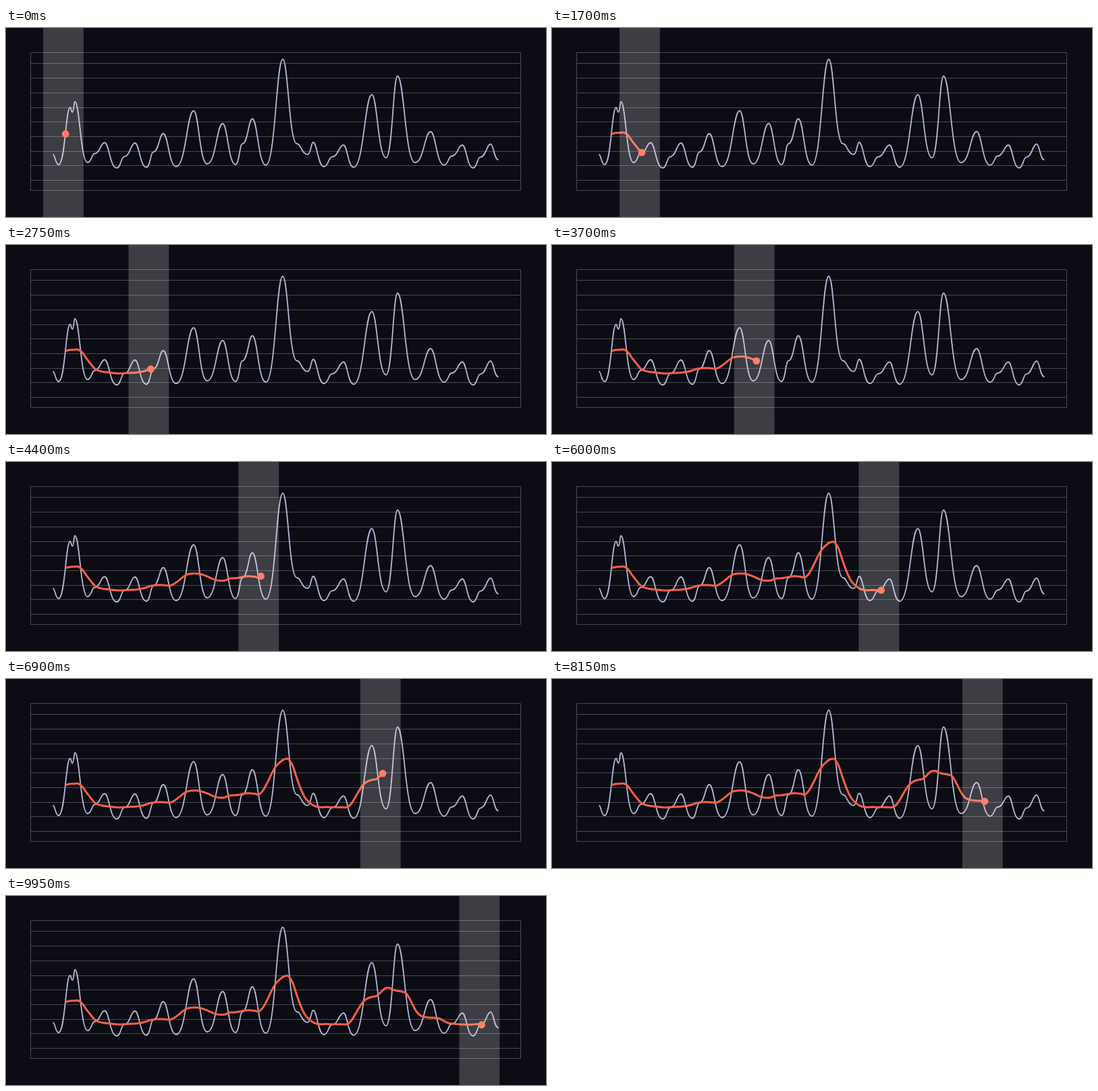
Write an HTML page that moves like this. It is 800x281 px and loops after 10 s.

```html
<!DOCTYPE html>
<html lang="en">
<head>
<meta charset="utf-8">
<title>Moving average</title>
<style>
  html, body { margin: 0; width: 100%; height: 100%; overflow: hidden; background: #0c0c15; }
  svg { display: block; width: 800px; height: 281px; }
  path { fill: none; stroke-linejoin: round; }
  #grid { stroke: #4a4a53; }
  #signal { stroke: #b6b5d3; stroke-width: 1.8; }
  #average { stroke: #ff5f45; stroke-width: 3; }
  #dot { fill: #ff5f45; }
  #band { fill: #fff; fill-opacity: .2; }
</style>
</head>
<body>
<svg viewBox="0 0 800 281">
  <path id="grid"/>
  <path id="signal"/>
  <path id="average"/>
  <circle id="dot" r="5.4"/>
  <rect id="band" width="59.8" height="281"/>
</svg>
<script>
const LOOP = 10000, TRAVEL = 9950;
const START = 69.5, DAY = 660 / 106, AVERAGED_DAYS = 100;
const get = id => document.getElementById(id);

// Turning points of the signal: weekly peaks and the valleys between them.
const turns = [
  [69.5, 188], [78, 203], [95, 118], [98.5, 125], [102, 109.5], [121, 200], [146, 170.5],
  [164, 208], [191, 171], [208, 207], [233, 157], [252, 206], [278, 123], [298, 202],
  [321, 142], [340, 203], [365, 135], [385, 204], [410, 46.5], [431, 172], [447, 188],
  [455, 170], [471, 206], [500, 174], [515, 207], [542, 99], [563, 193], [580, 71.5],
  [606, 200], [629, 154], [649, 204], [676, 174], [692, 208], [718, 172.5], [729.5, 196]
];

// Slow, low climbs pause on a shelf on the way up.
const knots = turns.flatMap(([x, y], i) => {
  const [nextX, nextY] = turns[i + 1] || [x, y];
  const run = nextX - x, rise = y - nextY;
  const shelf = run >= 25 && rise > 0 && rise < 70;
  return shelf ? [[x, y], [x + run * .4, y - rise * .45]] : [[x, y]];
});

// Level tangents at both ends; valleys are broader than peaks.
const handle = (y, otherY) => y > otherY ? .56 : .38;

const signalPath = "M" + knots[0] + knots.slice(1).map(([x, y], i) => {
  const [x0, y0] = knots[i], run = x - x0;
  return `C${x0 + run * handle(y0, y)},${y0} ${x - run * handle(y, y0)},${y} ${x},${y}`;
}).join("");

function signalAt(x) {
  const i = Math.max(1, knots.findIndex(k => k[0] >= x));
  const [x0, y0] = knots[i - 1], [x1, y1] = knots[i];
  const a = handle(y0, y1), b = 1 - handle(y1, y0), goal = (x - x0) / (x1 - x0);
  let low = 0, high = 1, s = .5;
  for (let n = 0; n < 20; n++) {
    const reached = 3 * s * (1 - s) ** 2 * a + 3 * s * s * (1 - s) * b + s ** 3;
    if (reached < goal) low = s; else high = s;
    s = (low + high) / 2;
  }
  return y0 + (y1 - y0) * s * s * (3 - 2 * s);
}

// Mean of seven days centred on the given day.
function averageAt(day) {
  let sum = 0;
  for (let d = -3; d <= 3; d++) sum += signalAt(START + (day + d) * DAY);
  return sum / 7;
}

// Catmull-Rom curve through equally spaced values.
function evenPath(x0, step, values) {
  const value = i => values[Math.min(Math.max(i, 0), values.length - 1)];
  const tangent = i => (value(i + 1) - value(i - 1)) / 6;
  let d = `M${x0},${values[0]}`;
  for (let i = 1; i < values.length; i++) {
    const x = x0 + i * step;
    d += `C${x - step * 2 / 3},${value(i - 1) + tangent(i - 1)} ` +
         `${x - step / 3},${value(i) - tangent(i)} ${x},${value(i)}`;
  }
  return d;
}

let gridPath = "M36.5,36.5H762.5V241.5H36.5Z";
for (let i = 0; i < 9; i++) gridPath += `M36.5,${Math.floor(52.95 + i * 21.7) + .5}H762.5`;
get("grid").setAttribute("d", gridPath);
get("signal").setAttribute("d", signalPath);

const trail = get("average"), dot = get("dot"), band = get("band");
const averages = Array.from({ length: AVERAGED_DAYS }, (_, i) => averageAt(i + 3));
trail.setAttribute("d", evenPath(START + 3 * DAY, DAY, averages));
const total = trail.getTotalLength();

function draw() {
  const t = Math.min(performance.now() % LOOP / TRAVEL, 1);
  const length = total * t * t * (3 - 2 * t);
  const point = trail.getPointAtLength(length);
  trail.setAttribute("stroke-dasharray", `${length} ${total + 10}`);
  dot.setAttribute("cx", point.x);
  dot.setAttribute("cy", point.y);
  band.setAttribute("x", point.x - 33.1);
  requestAnimationFrame(draw);
}
draw();
</script>
</body>
</html>
```
